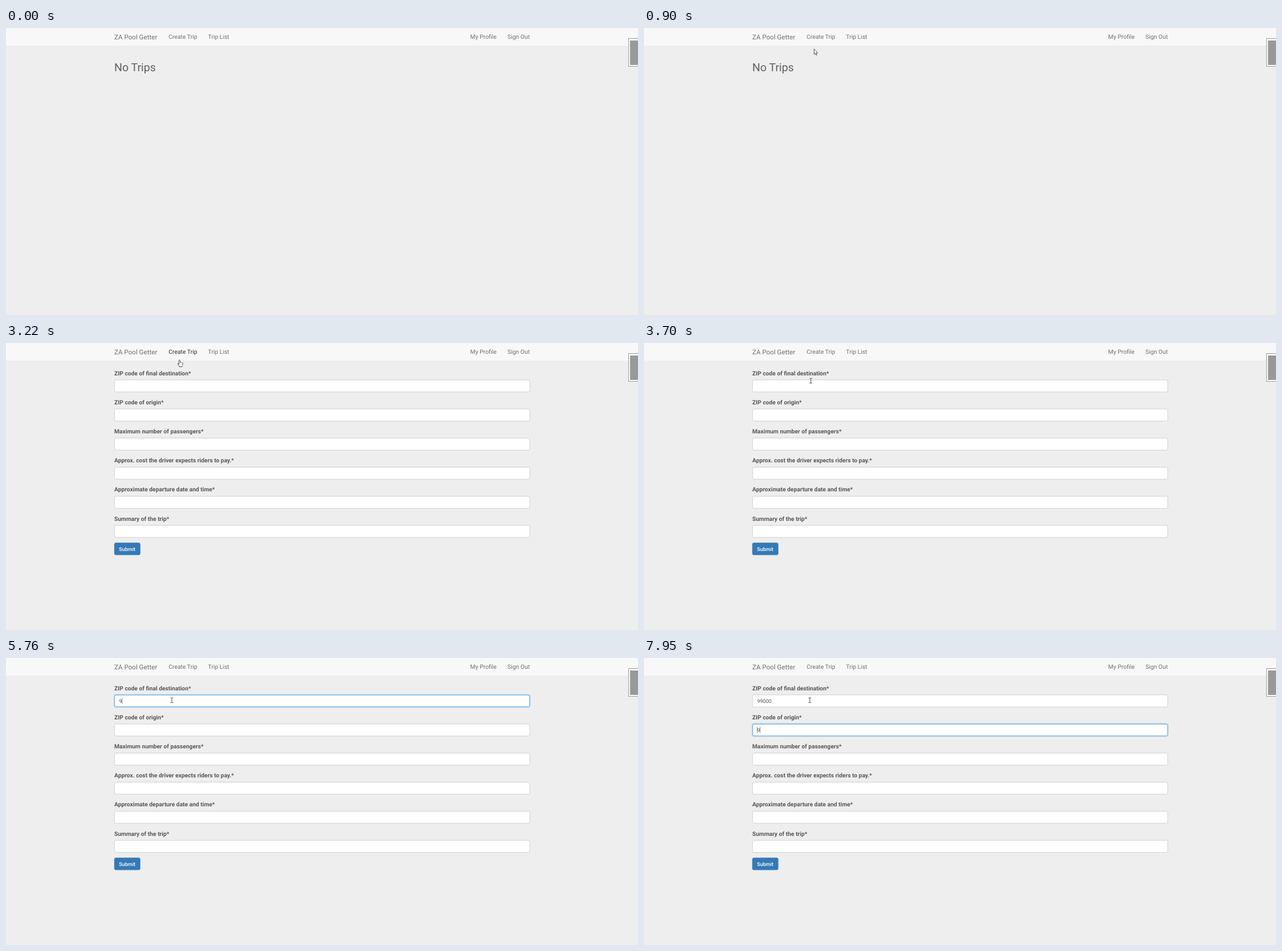
Recreate the animation shown at these times as an HTML page. Size 1109 by 505 pixels, loop 8000 ms.

```html
<!DOCTYPE html>
<html lang="en">
<head>
<meta charset="utf-8">
<title>Create a trip</title>
<style>
  html, body { margin: 0; width: 100%; height: 100%; overflow: hidden; background: #eee; }
  svg { display: block; width: 1109px; height: 505px; }
  text { font-family: Roboto, sans-serif; text-rendering: geometricPrecision; white-space: pre; }
  .nav { font-size: 10.4px; fill: #707070; }
  .brand { font-size: 11.6px; }
  .heading { font-size: 19.55px; fill: #606060; }
  .label { font-size: 10.26px; font-weight: 700; fill: #585858; }
  .value { font-size: 9.1px; fill: #555; }
  .button { font-size: 9.1px; font-weight: 500; fill: #fff; }
  .caret { stroke: #666; stroke-width: .8; }
</style>
</head>
<body>
<svg id="stage" viewBox="0 0 1109 505">
  <rect width="1109" height="505" fill="#eee"/>
  <rect width="1109" height="31" fill="#f8f8f8"/>
  <text class="nav brand" x="190" y="19.8">ZA Pool Getter</text>
  <text class="nav" id="create" x="285.2" y="19.2">Create Trip</text>
  <text class="nav" x="354.6" y="19.2">Trip List</text>
  <text class="nav" x="814.6" y="19.2">My Profile</text>
  <text class="nav" x="880" y="19.2">Sign Out</text>

  <rect x="1092.5" y="18.5" width="50" height="49" fill="#fff" stroke="#999"/>
  <rect x="1095" y="22" width="43" height="43" fill="#999"/>

  <text class="heading" id="empty" x="190" y="75.7">No Trips</text>
  <g id="form">
    <g id="fields"></g>
    <rect x="190.3" y="351.8" width="45" height="21" rx="2.4" fill="#337ab7" stroke="#2e6da4" stroke-width=".7"/>
    <text class="button" x="198.2" y="365.6">Submit</text>
  </g>

  <g id="cursor" stroke-linejoin="round" stroke-linecap="round">
    <g id="arrow">
      <path d="M.4 .3V9.3L2.4 7.4L4 10.9L5.3 10.3L3.8 6.9H6.4Z" fill="#fff" stroke="#222" stroke-width=".75"/>
      <circle id="busy" cx="7.7" cy="0" r="3.4" fill="#d9effc" stroke="#2f8fdc" stroke-width="3"/>
    </g>
    <path id="hand" fill="#fff" stroke="#222" stroke-width=".75"
      d="M-1 8V1.2Q0-.4 1 1.2V5Q2 4.1 2.9 5.2Q3.9 4.5 4.5 5.7Q5.6 5.2 5.6 6.6V9Q5.4 10.5 4.5 11.5V12.7H-.5V11.6L-3.2 7.7Q-3.3 6.3-2.1 6.8Z"/>
    <path id="beam" fill="none" stroke="#444" stroke-width=".9" d="M-2-4.2H-.5L0-3.8L.5-4.2H2M0-3.8V3.8M-2 4.2H-.5L0 3.8L.5 4.2H2"/>
  </g>
</svg>
<script>
const LOOP = 8000;
const LABELS = [
  "ZIP code of final destination*", "ZIP code of origin*", "Maximum number of passengers*",
  "Approx. cost the driver expects riders to pay.*", "Approximate departure date and time*", "Summary of the trip*"
];
const ZIP = "99000";
const KEY_TIMES = [5760, 6010, 6420, 6600, 6700];
const SECOND_KEY = 7950;
const FIELD_STEP = 51.2, CHAR_WIDTH = 5.11, TEXT_X = 198.4;

// time, x, y of the pointer
const PATH = [
  [80, 964, 477], [250, 760, 350], [450, 490, 190], [620, 325, 88], [740, 281, 56], [850, 294, 43],
  [900, 298, 37], [1050, 303, 28], [1310, 307, 20], [2990, 307, 20], [3220, 304.5, 29],
  [3500, 299, 46], [3700, 292.8, 66.5], [3780, 291, 70.5], [3810, 291, 71.5], [3910, 291, 74.3]
];

const $ = id => document.getElementById(id);
const clamp = v => Math.max(0, Math.min(1, v));
const show = (node, on) => node.setAttribute("visibility", on ? "inherit" : "hidden");

function add(parent, tag, attributes, text = "") {
  const node = document.createElementNS("http://www.w3.org/2000/svg", tag);
  for (const name in attributes) node.setAttribute(name, attributes[name]);
  node.textContent = text;
  return parent.appendChild(node);
}

const fields = LABELS.map((label, i) => {
  const y = 64.9 + i * FIELD_STEP;
  const box = { x: 190.4, y, width: 728.6, height: 21.2, rx: 2.6 };
  const group = $("fields");
  add(group, "text", { class: "label", x: 190, y: y - 8.4 }, label);
  add(group, "rect", { ...box, fill: "#fff", stroke: "#c8c8c8", "stroke-width": .8 });
  const focus = add(group, "g", { opacity: 0 });
  add(focus, "rect", { ...box, fill: "none", stroke: "#66afe9", "stroke-width": 3, "stroke-opacity": .25 });
  add(focus, "rect", { ...box, fill: "none", stroke: "#66afe9", "stroke-width": .9 });
  const value = add(group, "text", { class: "value", x: TEXT_X, y: y + 13.8 });
  const carets = [0, 1].map(() => add(group, "path", { class: "caret", visibility: "hidden" }));
  return { y, focus, value, carets };
});

function placeCaret(field, index, column, visible) {
  const caret = field.carets[index];
  caret.setAttribute("d", `M${TEXT_X + .3 + column * CHAR_WIDTH} ${field.y + 5.4}v10.4`);
  show(caret, visible);
}

function pointerAt(t) {
  const next = PATH.findIndex(key => key[0] > t);
  if (next < 0) return PATH.at(-1).slice(1);
  if (next === 0) return PATH[0].slice(1);
  const [t0, x0, y0] = PATH[next - 1], [t1, x1, y1] = PATH[next];
  const k = (t - t0) / (t1 - t0);
  return [x0 + (x1 - x0) * k, y0 + (y1 - y0) * k];
}

function drawPointer(t) {
  const [x, y] = pointerAt(t);
  const busy = t >= 2330 && t < 2710;
  const hover = t > 850 && y < 31;
  const beam = t > 3000 && y > 64.5;
  const hand = hover && !busy;
  $("cursor").setAttribute("transform", `translate(${x} ${y})`);
  show($("cursor"), t >= 80);
  show($("hand"), hand);
  show($("beam"), beam);
  show($("arrow"), !hand && !beam);
  show($("busy"), busy);
  $("create").style.fill = hover ? "#333" : "";
}

function drawForm(t) {
  const loaded = t >= 2680;
  show($("empty"), !loaded);
  show($("form"), loaded);

  const [first, second] = fields;
  const entered = clamp((t - 4330) / 140) * (t >= 4370);
  const moved = clamp((t - 6990) / 170) * (t >= 7030);
  first.focus.setAttribute("opacity", entered * (1 - moved));
  second.focus.setAttribute("opacity", moved);

  const typed = KEY_TIMES.filter(time => t >= time).length;
  first.value.textContent = ZIP.slice(0, typed);
  placeCaret(first, 0, typed, t >= 4370 && t < 7030);

  const started = t >= SECOND_KEY;
  second.value.textContent = started ? "9" : "";
  placeCaret(second, 0, 0, t >= 7030);
  placeCaret(second, 1, 1, started);
}

function frame() {
  const t = performance.now() % LOOP;
  drawForm(t);
  drawPointer(t);
  requestAnimationFrame(frame);
}
frame();
</script>
</body>
</html>
```
